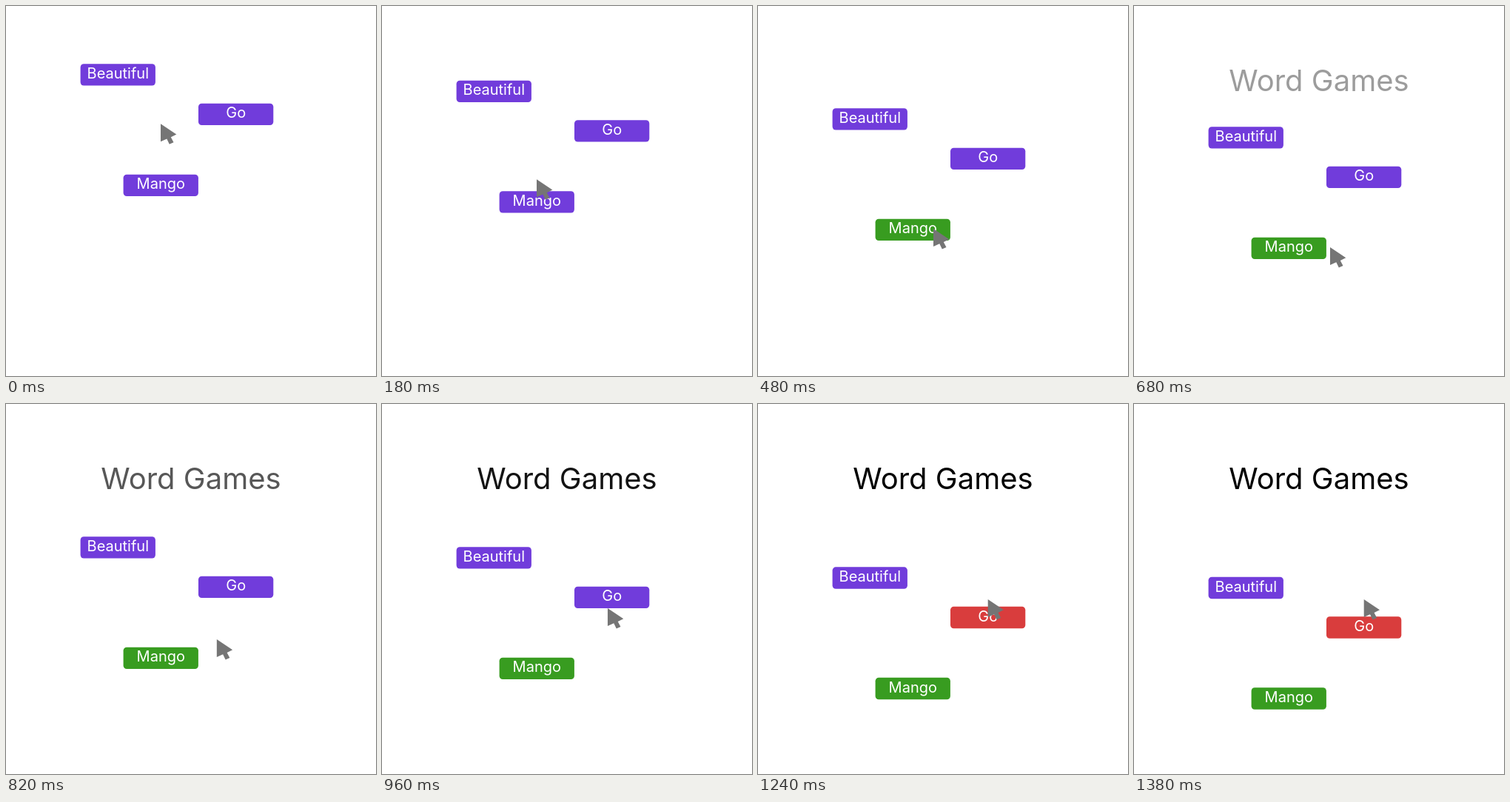
An HTML page for the animation above (1.52 s loop, 500x500 px).

```html
<!DOCTYPE html>
<html lang="en">
<head>
<meta charset="utf-8">
<title>Word Games</title>
<style>
  html, body { margin: 0; width: 100%; height: 100%; overflow: hidden; background: #fff; }
  svg { display: block; width: 100vw; height: 100vh; }
  text { font-family: Inter, sans-serif; text-anchor: middle; }
  .word { font-size: 20px; fill: #fff; }
  .title { font-size: 40px; }
</style>
</head>
<body>
<svg viewBox="0 0 500 500">
  <text class="title" id="title" x="250" y="115">Word Games</text>
  <g id="words"></g>
  <path id="cursor" fill="#757575" d="M0 0L21.3 14.3L13.8 18L17.5 25L11.8 27.5L8.3 20.3L0 24Z"/>
</svg>
<script>
const LOOP = 1520, STEP = 20, END = 1380;
const HIT_MANGO = 280, LEAVE = 760, HIT_GO = 1000;
const PURPLE = '#713cdb', GREEN = '#389c20', RED = '#d93d3d';

const words = [
  { text: 'Beautiful', x: 100.6, y: 78.2 },
  { text: 'Go', x: 260, y: 131.7, hitAt: HIT_GO, hitColor: RED },
  { text: 'Mango', x: 158.6, y: 227.7, hitAt: HIT_MANGO, hitColor: GREEN },
];

// Keys are [time, value] pairs.
const fall = [[0, 0], [LEAVE, 95], [HIT_GO, 119], [END, 155.6]];
const cursorX = [[HIT_MANGO, 209], [LEAVE, 276.2], [HIT_GO, 310.7]];
const cursorY = [[0, 159.3], [HIT_MANGO, 276], [LEAVE, 336], [HIT_GO, 264]];
const titleFade = [[480, 0], [HIT_GO, 1]];

function at(keys, t) {
  if (t <= keys[0][0]) return keys[0][1];
  for (let i = 1; i < keys.length; i++) {
    const [t0, v0] = keys[i - 1], [t1, v1] = keys[i];
    if (t < t1) return v0 + (v1 - v0) * (t - t0) / (t1 - t0);
  }
  return keys[keys.length - 1][1];
}

const el = id => document.getElementById(id);
const move = (node, x, y) => node.setAttribute('transform', `translate(${x} ${y})`);

el('words').innerHTML = words.map(w => `<g>
  <rect width="101.3" height="29.4" rx="4.5"/>
  <text class="word" x="50.7" y="19.8">${w.text}</text></g>`).join('');
words.forEach((w, i) => w.node = el('words').children[i]);

function draw(now) {
  const t = Math.floor(now % LOOP / STEP) * STEP;
  for (const w of words) {
    move(w.node, w.x, w.y + at(fall, t));
    w.node.firstElementChild.setAttribute('fill', t >= w.hitAt ? w.hitColor : PURPLE);
  }
  move(el('cursor'), at(cursorX, t), at(cursorY, t));
  el('title').setAttribute('opacity', at(titleFade, t));
}

const start = performance.now();
function tick() {
  draw(performance.now() - start);
  requestAnimationFrame(tick);
}
tick();
</script>
</body>
</html>
```
